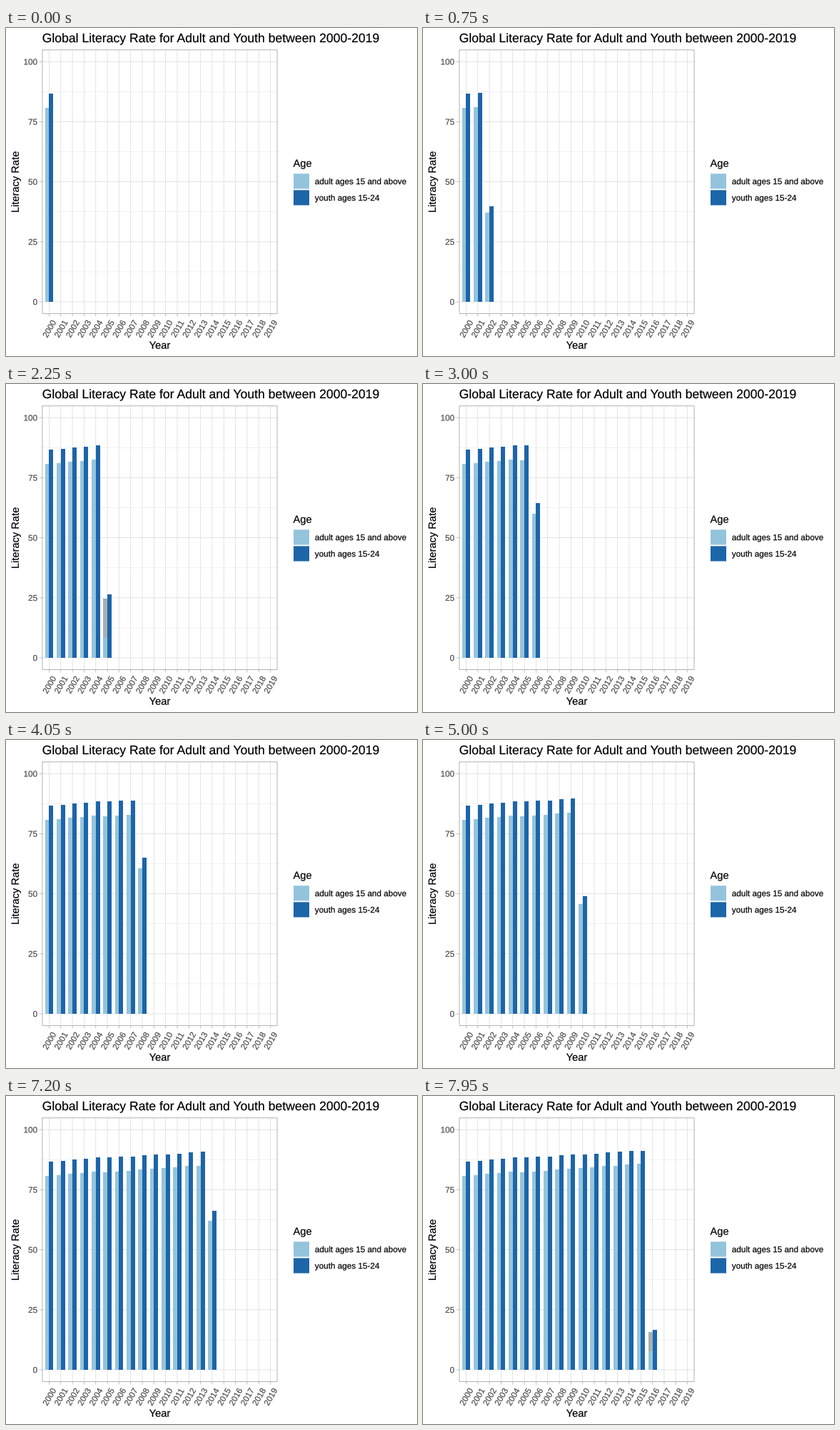
Write a matplotlib script that moves like this. It is 576 by 460 pixels and loops after 8000 ms.

```python
import matplotlib.pyplot as plt
from matplotlib.animation import FuncAnimation
from matplotlib.patches import PathPatch, Rectangle
from matplotlib.textpath import TextPath
from matplotlib.transforms import Affine2D

W, H, DPI = 576, 460, 64
FRAMES, INTERVAL = 160, 50
LEFT, RIGHT, TOP, BOTTOM = 50.65, 380.35, 30.4, 400.85
STEP = (RIGHT - LEFT) / 20.2
BAR = 0.35 * STEP
UNIT = (BOTTOM - TOP) / 110

LIGHT, DARK, MUTED = "#94c4dc", "#1c65a8", "#a5afb6"
EDGE, MAJOR, MINOR, AXIS_TEXT = "#b3b3b3", "#dedede", "#ebebeb", "#4d4d4d"

ADULT = [80.7, 81.0, 81.6, 81.9, 82.5, 82.2, 82.5, 82.8, 83.3, 83.7,
         84.0, 84.3, 84.8, 84.9, 85.4, 85.8, 86.0]
YOUTH = [86.6, 87.0, 87.5, 87.8, 88.4, 88.5, 88.7, 88.8, 89.5, 89.6,
         89.6, 89.9, 90.5, 90.8, 91.1, 91.2, 91.3]
# Frame at which each year's bars are complete: 20 years over 200 frames
DONE = [round(k * 199 / 19) for k in range(len(ADULT))]

plt.rcParams["font.family"] = "Liberation Sans"

fig = plt.figure(figsize=(W / DPI, H / DPI), dpi=DPI, facecolor="white")
ax = fig.add_axes([0, 0, 1, 1])
ax.set_xlim(0, W)
ax.set_ylim(H, 0)
ax.axis("off")


def pt(px):
    return px * 72 / DPI


def year_x(k):
    return LEFT + STEP * (0.6 + k)


def rate_y(v):
    return BOTTOM - UNIT * (v + 5)


def line(xs, ys, color, z=1, width=0.8):
    ax.plot(xs, ys, color=color, lw=pt(width), zorder=z, snap=False,
            solid_capstyle="butt", solid_joinstyle="miter")


def label(x, y, s, size, color="black", align=0.0, angle=0):
    """Text outline with its baseline at y; align is 0 left, 0.5 centre, 1 right."""
    path = TextPath((0, 0), s, size=size)
    box = path.get_extents()
    shift = -align * (box.x0 + box.x1) if align == 0.5 else -align * box.x1
    place = Affine2D().translate(shift, 0).rotate_deg(angle).scale(1, -1)
    ax.add_patch(PathPatch(place.translate(x, y).transform_path(path),
                           fc=color, ec=color, lw=pt(0.2), zorder=7, snap=False))


def rect(x, y, w, h, color, z=3, snap=None):
    return ax.add_patch(Rectangle((x, y), w, h, fc=color, lw=0, zorder=z, snap=snap))


def set_bar(bar, low, high):
    bar.set_y(rate_y(high))
    bar.set_height(UNIT * (high - low))


# Grid, axes and frame
for v in (12.5, 37.5, 62.5, 87.5):
    line([LEFT, RIGHT], [rate_y(v)] * 2, MINOR, width=0.6)
for v in range(0, 101, 25):
    y = rate_y(v)
    line([LEFT, RIGHT], [y, y], MAJOR, 2)
    line([LEFT - 3.7, LEFT], [y, y], EDGE, 2)
    label(LEFT - 7, y + 4.2, str(v), 11.73, AXIS_TEXT, 1)
for k in range(20):
    x = year_x(k)
    line([x, x], [TOP, BOTTOM], MAJOR, 2)
    line([x, x], [BOTTOM, BOTTOM + 3.7], EDGE, 2)
    label(x + 3.8, 423.8, str(2000 + k), 11.73, AXIS_TEXT, 0.5, 60)
x0, x1, y0, y1 = LEFT + 0.3, RIGHT - 0.3, TOP + 0.3, BOTTOM - 0.3
line([x0, x1, x1, x0, x0], [y0, y0, y1, y1, y0], EDGE, 6, 1)

# Titles and legend
label(LEFT, 20, "Global Literacy Rate for Adult and Youth between 2000-2019", 17.6)
label((LEFT + RIGHT) / 2, 449.8, "Year", 14.67, align=0.5)
label(17.9, (TOP + BOTTOM) / 2, "Literacy Rate", 14.67, align=0.5, angle=90)
label(402.5, 194.7, "Age", 14.67)
for n, (name, color) in enumerate([("adult ages 15 and above", LIGHT),
                                   ("youth ages 15-24", DARK)]):
    top = 204.3 + 23.04 * n
    rect(403, top, 22, 21.2, color, snap=False)
    label(432.8, top + 14.8, name, 11.73)

# The light bars reach slightly under the dark ones to avoid a seam
adults = [rect(year_x(k) - BAR, 0, BAR + 0.5, 0, LIGHT, 3) for k in range(len(ADULT))]
tints = [rect(year_x(k) - BAR, 0, BAR + 0.5, 0, MUTED, 4) for k in range(len(ADULT))]
youths = [rect(year_x(k), 0, 6, 0, DARK, 5) for k in range(len(ADULT))]


def update(i):
    for k, done in enumerate(DONE):
        start = DONE[k - 1] if k else -1
        span = done - start
        step = min(max(i - start, 0), span)
        grown = step / span
        set_bar(adults[k], 0, ADULT[k] * grown)
        set_bar(youths[k], 0, YOUTH[k] * grown)
        # Early in its growth the light bar is greyish above its first step
        tinted = span > 1 and 2 <= step <= 4
        base = ADULT[k] / span
        set_bar(tints[k], base, ADULT[k] * grown if tinted else base)
    return adults + tints + youths


anim = FuncAnimation(fig, update, frames=FRAMES, interval=INTERVAL,
                     repeat=True, repeat_delay=0)
plt.show()
```
